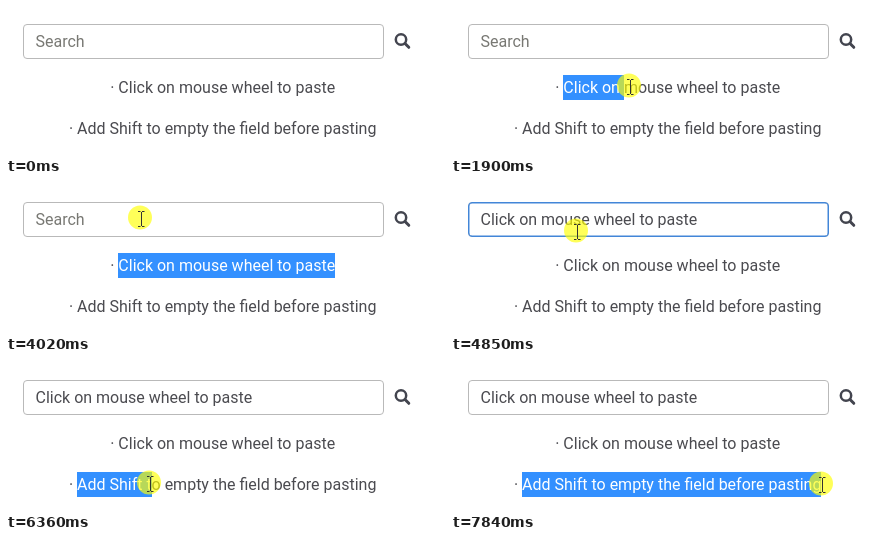
Write an HTML page that moves like this. It is 439 px wide and 150 px high and loops after 8 s.

```html
<!DOCTYPE html>
<html lang="en">
<head>
<meta charset="utf-8">
<title>Middle-click paste</title>
<style>
  html, body { margin: 0; width: 100%; height: 100%; overflow: hidden; background: #fff; }
  #stage {
    position: relative; width: 439px; height: 150px; overflow: hidden;
    font: 16px/25px Roboto, sans-serif; color: #4b4b50; white-space: nowrap;
  }
  #stage > *, .sel { position: absolute; box-sizing: border-box; }
  #field, #focus {
    left: 17px; top: 18px; width: 361px; height: 35px;
    border: 1px solid #b9b9b9; border-radius: 4px;
  }
  #focus { border-color: #4286d8; box-shadow: inset 0 0 0 .5px #4286d8; }
  #value { left: 29.5px; top: 23px; }
  #value.empty { color: #787873; }
  #caret { left: 246px; top: 26px; width: 1px; height: 19px; background: #333; }
  .line { left: 0; width: 433.3px; height: 25px; text-align: center; }
  .line span { display: inline-block; position: relative; }
  .sel { left: 0; top: 0; height: 25px; overflow: hidden; text-align: left; background: #3390ff; color: #fff; }
  #one { top: 69px; }
  #two { top: 110px; }
  svg { left: 0; top: 0; }
</style>
</head>
<body>
<div id="stage">
  <div id="field"></div>
  <div id="focus"></div>
  <div id="value"></div>
  <div id="caret"></div>
  <div class="line" id="one">· <span>Click on mouse wheel to paste</span></div>
  <div class="line" id="two">· <span>Add Shift to empty the field before pasting</span></div>
  <svg width="439" height="150">
    <g fill="none" stroke="#43454f">
      <circle cx="395" cy="33.5" r="5.2" stroke-width="2.5"/>
      <path d="M399 37.5l3.8 3.8" stroke-width="3" stroke-linecap="round"/>
    </g>
    <g id="pointer">
      <circle cx="1" cy="-.5" r="12" fill="#ff0" opacity=".65"/>
      <path id="beam" d="M-1 -6.5h2.5M3 -6.5h2.5M2.5 -6v14M-1 8.5h2.5M3 8.5h2.5" fill="none" stroke="#333"/>
      <path id="arrow" d="M0 0v16l3.7-3.6 2.4 5.6 2.2-1-2.4-5.4h5z" fill="#fff" stroke="#222"/>
    </g>
  </svg>
</div>
<script>
const LOOP = 8000, ENTER = 630, PASTE = 4080, BLUR = 5800, FADE = 100, BLINK = 500;
const $ = id => document.getElementById(id);
const clamp = v => Math.max(0, Math.min(1, v));
const show = (el, on) => { el.style.visibility = on ? 'visible' : 'hidden'; };
const inside = (box, x, y) => x > box.left && x < box.right && y > box.top && y < box.bottom;

const one = makeLine('one', 1700, 2920, PASTE);
const two = makeLine('two', BLUR, LOOP, LOOP);
const lines = [one, two];
const field = $('field').getBoundingClientRect();

// Each move starts where the previous one rests
const moves = [];
const move = (start, end, x, y) => moves.push({ start, end, x, y });
move(ENTER, 1420, one.left + 3, 80);
move(1700, 2440, one.right - 25, 80);
move(2470, 2920, one.right, 80);
move(3090, 3120, field.right + 10, 55);
move(3320, 3720, 133, 34);
move(4760, 5490, two.left + 2, 122);
move(BLUR, 6480, 151, 121);
move(6480, 7840, two.right - 1, 122);

function pointerAt(t) {
  let x = 169, y = 159;
  for (const m of moves) {
    const u = 1 - (1 - clamp((t - m.start) / (m.end - m.start))) ** 1.25;
    x += (m.x - x) * u;
    y += (m.y - y) * u;
  }
  return { x, y };
}

function makeLine(id, start, end, clear) {
  const span = $(id).querySelector('span'), text = span.textContent;
  const { left, right, top, bottom } = span.getBoundingClientRect();
  const range = document.createRange();
  range.setStart(span.firstChild, 0);
  const stops = [...text].map((_, i) => {
    range.setEnd(span.firstChild, i + 1);
    return range.getBoundingClientRect().width;
  });
  stops.unshift(0);
  const sel = document.createElement('div');
  sel.className = 'sel';
  sel.textContent = text;
  span.append(sel);
  return {
    text, left, right, top, bottom,
    dragging: t => t >= start && t < end,
    draw(t) {
      const x = pointerAt(Math.min(t, end)).x + 2 - left;
      const near = stops.reduce((a, b) => Math.abs(b - x) < Math.abs(a - x) ? b : a);
      sel.style.width = (t >= start && t < clear ? near : 0) + 'px';
    }
  };
}

function draw(t) {
  const { x, y } = pointerAt(t);
  const over = box => inside(box, x + 2, y + 1);
  const beam = over(field) || lines.some(l => l.dragging(t) || over(l));

  $('pointer').setAttribute('transform', `translate(${Math.round(x)} ${Math.round(y)})`);
  show($('pointer'), t >= ENTER);
  show($('beam'), beam && t >= ENTER);
  show($('arrow'), !beam && t >= ENTER);
  lines.forEach(l => l.draw(t));

  const pasted = t >= PASTE;
  $('value').textContent = pasted ? one.text : 'Search';
  $('value').className = pasted ? '' : 'empty';
  $('focus').style.opacity = clamp((t - 4050) / FADE) * clamp(1 - (t - BLUR) / FADE);
  show($('caret'), pasted && t < BLUR && Math.floor((t - 3930) / BLINK) % 2 === 0);
}

const begin = performance.now();
function tick() {
  draw((performance.now() - begin) % LOOP);
  requestAnimationFrame(tick);
}
tick();
</script>
</body>
</html>
```
